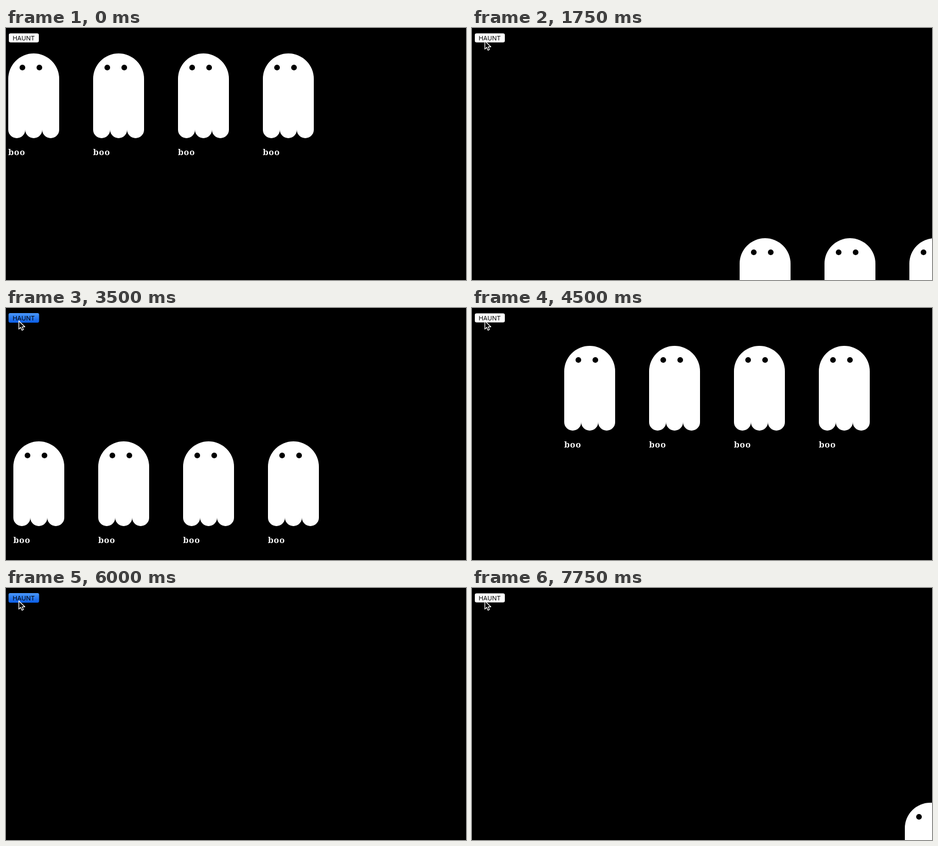
Recreate the animation shown at these times as an HTML page. Size 813 by 446 pixels, loop 8000 ms.

```html
<!DOCTYPE html>
<html lang="en">
<head>
<meta charset="utf-8">
<title>Haunt</title>
<style>
  html, body { margin: 0; width: 100%; height: 100%; overflow: hidden; background: #000; }
  svg { display: block; width: 100vw; height: 100vh; }
  .label { font: 400 11px Inter, Roboto, sans-serif; }
  .boo { font: 600 15px "Noto Serif", "Liberation Serif", serif; letter-spacing: .6px; fill: #fff; }
</style>
</head>
<body>
<svg viewBox="0 0 813 446">
  <defs>
    <linearGradient id="blue" x2="0" y2="1">
      <stop offset="0" stop-color="#4a97fa"/>
      <stop offset="1" stop-color="#0a5de6"/>
    </linearGradient>
    <g id="ghost">
      <path fill="#fff" d="M0 135V45a45 45 0 0 1 90 0V135a15 15 0 0 1-30 0a15 15 0 0 1-30 0a15 15 0 0 1-30 0Z"/>
      <circle cx="25" cy="25" r="5"/>
      <circle cx="55" cy="25" r="5"/>
      <text class="boo" x="0" y="180">boo</text>
    </g>
  </defs>
  <g id="ghosts">
    <use href="#ghost"/>
    <use href="#ghost" x="150"/>
    <use href="#ghost" x="300"/>
    <use href="#ghost" x="450"/>
  </g>
  <rect id="idle" x="5" y="9.5" width="53" height="16" rx="3" fill="#fff"/>
  <rect id="pressed" x="4.5" y="9" width="54" height="17" rx="3" fill="url(#blue)"/>
  <text class="label" x="11.7" y="22">HAUNT</text>
  <path id="cursor" stroke="#fff" stroke-width="1.25" stroke-linejoin="round"
    d="M.7 1V15.4L4 12.3L6.3 17.4L8.8 16.3L6.6 11.3H11.3Z"/>
</svg>
<script>
  const TICK = 250, TICKS = 32;

  // The ghosts jump to x, y at a tick and stay for one tick unless told otherwise.
  const haunts = [
    { at: 0, x: 4, y: 45, stay: 7 },
    { at: 7, x: 473, y: 372 },
    { at: 10, x: 465, y: 226 },
    { at: 14, x: 13, y: 236 },
    { at: 15, x: 541, y: 370, stay: 2 },
    { at: 17, x: 620, y: 370 },
    { at: 18, x: 163, y: 67 },
    { at: 19, x: 403, y: 300 },
    { at: 20, x: 229, y: 300 },
    { at: 22, x: 497, y: 106, stay: 2 },
    { at: 25, x: 600, y: 237 },
    { at: 27, x: 435, y: 419 },
    { at: 28, x: 585, y: 400 },
    { at: 30, x: 610, y: 350 },
    { at: 31, x: 765, y: 380 }
  ];
  const toggles = [8, 10, 14, 18, 19, 21, 22, 25, 26, 28, 30, 31];

  const el = id => document.getElementById(id);
  const ghosts = el("ghosts"), cursor = el("cursor"), idle = el("idle"), pressed = el("pressed");

  const show = (node, on) => node.setAttribute("visibility", on ? "visible" : "hidden");

  function place(node, spot) {
    show(node, spot);
    if (spot) node.setAttribute("transform", `translate(${spot.x} ${spot.y})`);
  }

  // The pointer enters on tick 2 and climbs to the button in two steps.
  function pointer(tick) {
    const step = Math.min(tick - 2, 2);
    return step >= 0 && { x: Math.min(14 + 8 * step, 22), y: 30 - 4 * step };
  }

  function draw(tick) {
    const down = toggles.filter(n => n <= tick).length % 2 === 1;
    place(ghosts, haunts.find(({ at, stay = 1 }) => tick >= at && tick < at + stay));
    place(cursor, pointer(tick));
    show(idle, !down);
    show(pressed, down);
  }

  const start = performance.now();
  function frame(now) {
    draw(Math.floor(Math.max(0, now - start) / TICK) % TICKS);
    requestAnimationFrame(frame);
  }
  draw(0);
  requestAnimationFrame(frame);
</script>
</body>
</html>
```
